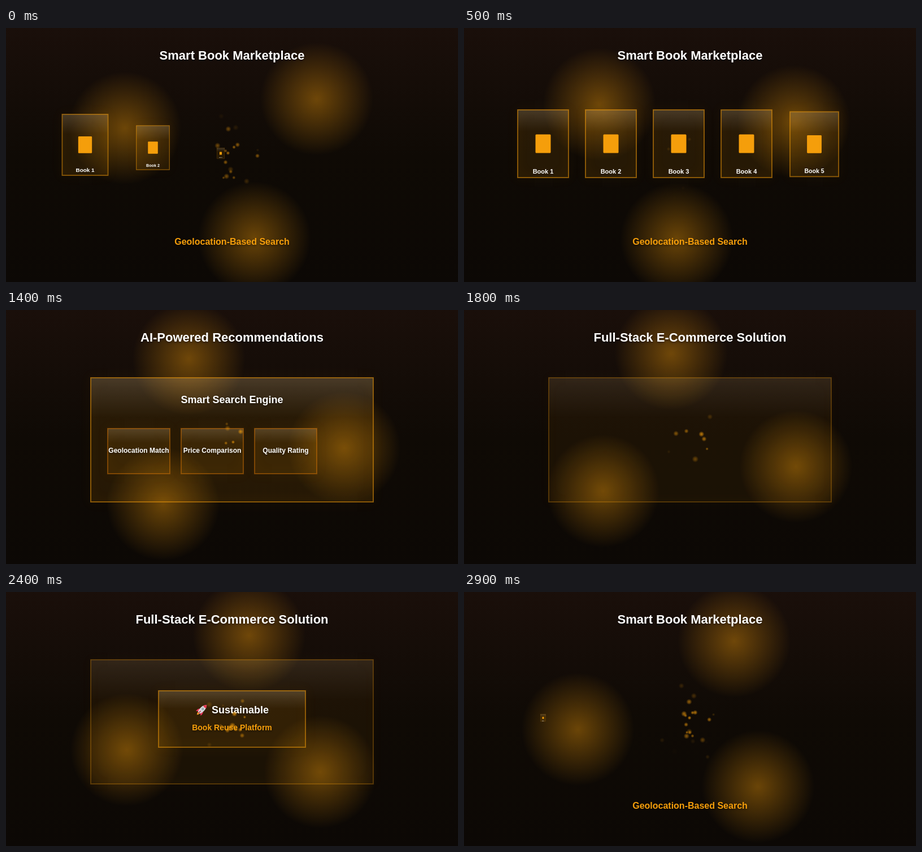
An HTML page with a canvas that plays this animation: 800 px wide and 450 px high, repeating every 3000 ms.

```html
<!DOCTYPE html>
<html lang="en">
<head>
<meta charset="utf-8">
<title>Smart Book Marketplace</title>
<style>
  html, body { margin: 0; width: 100%; height: 100%; overflow: hidden; background: #0d0905; }
  canvas { display: block; }
</style>
</head>
<body>
<canvas id="stage" width="800" height="450"></canvas>
<script>
const ctx = document.getElementById('stage').getContext('2d');
const LOOP = 3000, CX = 400, CY = 225;
const SEARCH_START = 692, SOLUTION_START = 1788, MARKET_START = 2884;
const AMBER = '#f59e0b';
const amber = a => `rgba(245,158,11,${a})`;
const clamp = v => Math.max(0, Math.min(1, v));
const easeOut = p => 1 - (1 - p) ** 3;

function random(seed) {
  const v = Math.sin(seed * 127.1 + 31.7) * 43758.5453;
  return v - Math.floor(v);
}

function text(str, x, y, size, color = '#fff', align = 'center', shadow = true) {
  ctx.save();
  ctx.font = `bold ${size}px "Liberation Sans", Arial, sans-serif`;
  ctx.textAlign = align;
  ctx.fillStyle = color;
  if (shadow) {
    ctx.shadowColor = 'rgba(0,0,0,0.5)';
    ctx.shadowBlur = 4;
    ctx.shadowOffsetY = 2;
  }
  ctx.fillText(str, x, y);
  ctx.restore();
}

// Translucent box with a lit top edge and an amber outline
function glass(x, y, w, h, strength = 1, border = amber(0.5)) {
  ctx.save();
  ctx.globalAlpha *= strength;
  ctx.fillStyle = amber(0.1);
  ctx.fillRect(x, y, w, h);
  const shine = ctx.createLinearGradient(0, y, 0, y + h * 0.32);
  shine.addColorStop(0, 'rgba(255,255,255,0.13)');
  shine.addColorStop(1, 'rgba(255,255,255,0)');
  ctx.fillStyle = shine;
  ctx.fillRect(x, y, w, h * 0.32);
  ctx.shadowColor = amber(0.4);
  ctx.shadowBlur = 20;
  ctx.strokeStyle = border;
  ctx.lineWidth = 2;
  ctx.strokeRect(x, y, w, h);
  ctx.restore();
}

function scaled(x, y, scale, draw) {
  ctx.save();
  ctx.translate(x, y);
  ctx.scale(scale, scale);
  draw();
  ctx.restore();
}

function background() {
  const g = ctx.createLinearGradient(0, 0, 0, 450);
  g.addColorStop(0, '#1a0f0a');
  g.addColorStop(0.5, '#0f0a05');
  g.addColorStop(1, '#0c0805');
  ctx.fillStyle = g;
  ctx.fillRect(0, 0, 800, 450);
}

function glows(t) {
  const step = t / 100;
  const turn = 198.5 + 3.725 * step - 0.0161 * step * step;
  for (let i = 0; i < 3; i++) {
    const a = (turn + i * 120) * Math.PI / 180;
    const x = CX + 200 * Math.cos(a), y = CY + 150 * Math.sin(a);
    const g = ctx.createRadialGradient(x, y, 0, x, y, 100);
    g.addColorStop(0, amber(0.4));
    g.addColorStop(1, amber(0));
    ctx.fillStyle = g;
    ctx.fillRect(x - 100, y - 100, 200, 200);
  }
}

function market(age) {
  for (let i = 0; i < 5; i++) {
    const p = clamp((age - i * 112) / 463);
    if (p === 0) continue;
    scaled(140 + i * 120, CY, easeOut(p), () => {
      glass(-45, -80, 90, 120);
      ctx.fillStyle = AMBER;
      ctx.beginPath();
      ctx.roundRect(-13.5, -36.5, 27, 33, 1.5);
      ctx.fill();
      text('Book ' + (i + 1), 0, 33, 11, '#fff', 'center', false);
    });
  }
  text('Smart Book Marketplace', CX, 56, 22);
  text('Geolocation-Based Search', CX, 384, 16, AMBER);
}

function search(age) {
  glass(150, 120, 500, 220);
  text('Smart Search Engine', CX, 165, 18);
  ['Geolocation Match', 'Price Comparison', 'Quality Rating'].forEach((label, i) => {
    const alpha = clamp((age - i * 219) / 205);
    if (alpha === 0) return;
    const x = 180 + i * 130;
    glass(x, 210, 110, 80, 1, 'rgba(217,119,6,0.45)');
    ctx.globalAlpha = alpha;
    text(label, x + 55, 253, 12);
    ctx.globalAlpha = 1;
  });
  text('AI-Powered Recommendations', CX, 56, 22);
}

function shape(color, path) {
  ctx.fillStyle = color;
  ctx.fill(new Path2D(path));
}

function rocket(x, y) {
  ctx.save();
  ctx.translate(x, y);
  ctx.rotate(Math.PI / 4);
  shape('#ffa726', 'M-2.2 7Q-2.5 10 0 12.5Q2.5 10 2.2 7Z');
  shape('#e8345a', 'M-3 0Q-7 3-6 9L-2.5 6.5ZM3 0Q7 3 6 9L2.5 6.5Z');
  shape('#d5d8da', 'M0-12Q-4.2-7.5-4.2-1Q-4.2 4-2.4 7.5H2.4Q4.2 4 4.2-1Q4.2-7.5 0-12Z');
  shape('#e53950', 'M0-12.3Q-2.6-9.8-3.5-6.6Q0-5.2 3.5-6.6Q2.6-9.8 0-12.3Z');
  shape('#78909c', 'M-2-2.2a2 2 0 1 0 4 0a2 2 0 1 0-4 0Z');
  shape('#b0bec5', 'M-1.2-2.2a1.2 1.2 0 1 0 2.4 0a1.2 1.2 0 1 0-2.4 0Z');
  shape('#c62848', 'M-.7 3H.7V9H-.7Z');
  ctx.restore();
}

function solution(age) {
  glass(150, 120, 500, 220, 0.55);
  const p = (age - 208) * 0.002626;
  if (p > 0) {
    // The growth curve runs on past its end, so the badge keeps expanding
    scaled(CX, CY, easeOut(p), () => {
      glass(-130, -50, 260, 100);
      rocket(-53.3, -16.4);
      text('Sustainable', -36, -10, 18, '#fff', 'left');
      text('Book Reuse Platform', 0, 20, 14, AMBER);
    });
  }
  text('Full-Stack E-Commerce Solution', CX, 56, 22);
}

function sparks(t) {
  for (let i = 0; i < 46; i++) {
    const r = k => random(i * 5 + k);
    const birth = 740 + 2150 * Math.sqrt((i + r(0)) / 46);
    const age = ((t - birth + LOOP) % LOOP) / (350 + 600 * r(1));
    if (age >= 1) continue;
    const angle = r(2) * Math.PI * 2;
    const dist = 8 + (25 + 60 * r(3)) * age;
    const x = CX + 8 + dist * Math.cos(angle), y = CY + dist * Math.sin(angle);
    const size = 2.5 + 3.5 * r(4);
    const g = ctx.createRadialGradient(x, y, 0, x, y, size);
    const alpha = 0.8 * (1 - age);
    g.addColorStop(0, amber(alpha));
    g.addColorStop(0.4, amber(alpha * 0.7));
    g.addColorStop(1, amber(0));
    ctx.fillStyle = g;
    ctx.fillRect(x - size, y - size, size * 2, size * 2);
  }
}

function frame(now) {
  const t = now % LOOP;
  background();
  glows(t);
  if (t < SEARCH_START) market(t + 248);
  else if (t < SOLUTION_START) search(t - SEARCH_START);
  else if (t < MARKET_START) solution(t - SOLUTION_START);
  else market(t - MARKET_START);
  sparks(t);
  requestAnimationFrame(frame);
}
requestAnimationFrame(frame);
</script>
</body>
</html>
```
